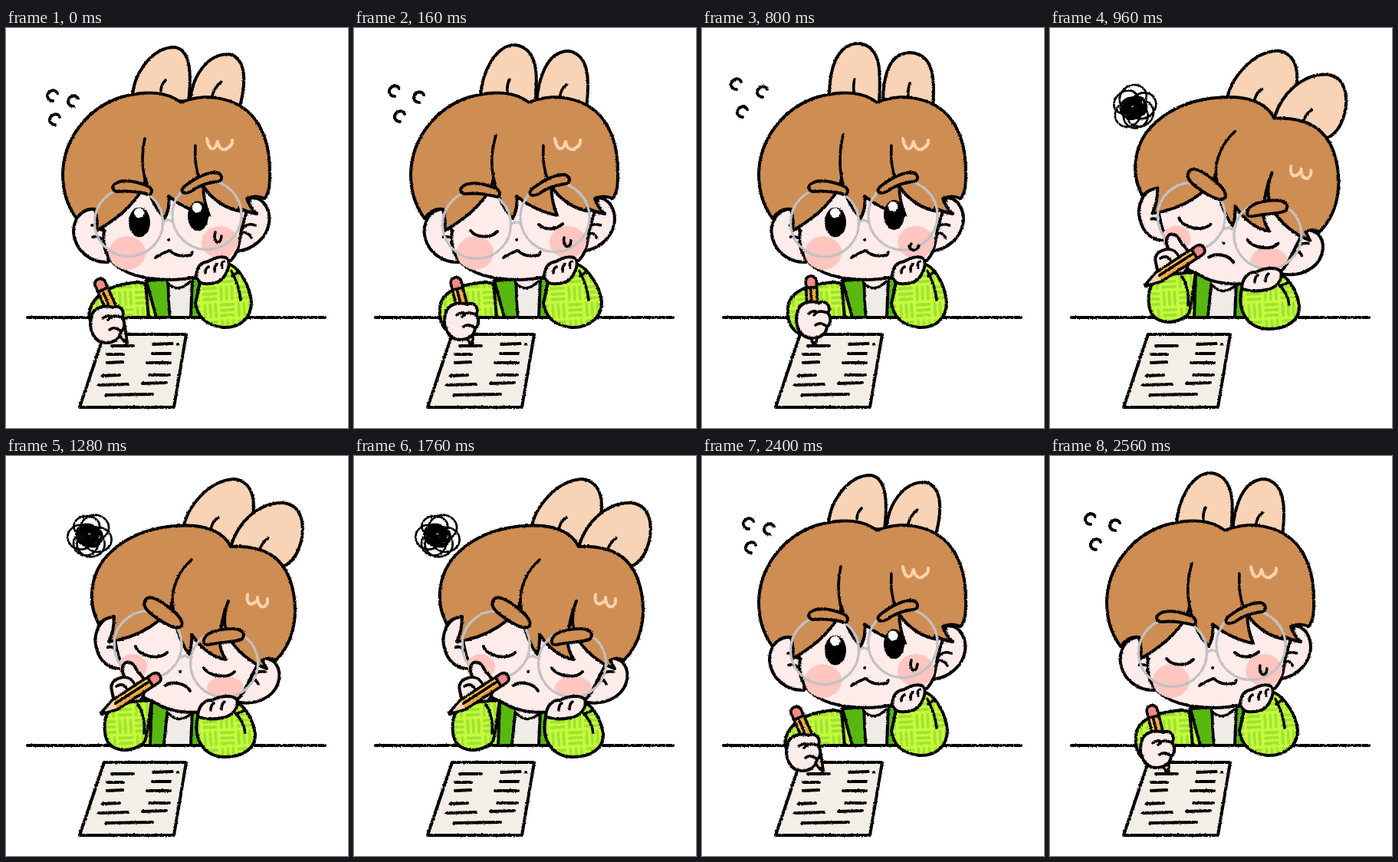
An HTML page for the animation above (2.72 s loop, 446 by 521 pixels).

```html
<!DOCTYPE html>
<html lang="en">
<head>
<meta charset="utf-8">
<style>
  html, body { margin: 0; width: 100%; height: 100%; overflow: hidden; background: #fff; }
  svg { display: block; width: 446px; height: 521px; }
</style>
</head>
<body>
<svg id="stage" viewBox="0 0 446 521" xmlns="http://www.w3.org/2000/svg"></svg>
<script>
const STEP = 160;
const ORDER = 'ABCABCDEFDEFABCAB';
const C = {
  hair: '#ce8d52', ear: '#f9d3b6', skin: '#feecea', blush: '#ffc6c0', lime: '#c6fd3b',
  knit: '#a0e234', green: '#58b810', shirt: '#efebe6', paper: '#f3efe6',
  glass: '#c1c1c4', shine: '#ffd3b1', pencil: '#ffc14c', grain: '#f4a33c', rubber: '#f58a88'
};

const shape = (d, fill = 'none', width = 4, stroke = '#000') =>
  `<path d="${d}" fill="${fill}" stroke="${stroke}" stroke-width="${width}"/>`;
const line = (d, width = 3.6) => shape(d, 'none', width);
const flat = (d, fill) => shape(d, fill, 0, 'none');
const oval = (x, y, rx, ry, fill) => `<ellipse cx="${x}" cy="${y}" rx="${rx}" ry="${ry}" fill="${fill}"/>`;
const ring = (x, y, r) => `<circle cx="${x}" cy="${y}" r="${r}" fill="none" stroke="${C.glass}" stroke-width="3.2"/>`;
const move = (x, y, art, turn = 0) => `<g transform="translate(${x} ${y}) rotate(${turn})">${art}</g>`;
const sleeve = d => flat(d, C.lime) + shape(d, 'url(#knit)');

const defs = `<defs>
  <filter id="rough" x="0" y="0" width="446" height="521" filterUnits="userSpaceOnUse" color-interpolation-filters="sRGB">
    <feTurbulence type="fractalNoise" baseFrequency=".6" numOctaves="1" seed="4"/>
    <feDisplacementMap in="SourceGraphic" scale="2.8" xChannelSelector="R" yChannelSelector="G"/>
  </filter>
  <pattern id="knit" width="44" height="44" patternUnits="userSpaceOnUse" patternTransform="translate(254 336) rotate(-3)">
    <path d="M3 4h16M3 11h16M3 18h16M25 26h16M25 33h16M25 40h16M26 3v16M33 3v16M40 3v16M4 25v16M11 25v16M18 25v16"
      stroke="${C.knit}" stroke-width="3.8" stroke-linecap="round"/>
  </pattern></defs>`;

const paper = shape('M128 399H235L219 494H96Z', C.paper) +
  line('M138 414h28M192 412l25-1M224 412v.1M132 425h21M191 424h23M132 436l20-1M184 436h30M126 453l22-1M187 452h26M121 465l38-1M178 463l31-1M130 478l61-1', 4);
const table = line('M28 377H416', 4.2);

const pencil = flat('M-7 12H7V68L1 89H-1L-7 68Z', C.pencil) + flat('M2 12H7V68H2Z', C.grain) +
  flat('M-7 68H7L1 89H-1Z', C.ear) + flat('M-7 13V4Q-6-2 0-2T7 4V13Z', C.rubber) +
  line('M-7 68V4Q-6-2 0-2T7 4V68L1 89H-1ZM-7 13H7M-1 16V66') + flat('M-3 83H3L0 91Z', '#000');

const fist = shape('M-20-12C-17-22-4-26 8-22C18-27 24-15 19-9C24-3 23 6 18 9C17 18 10 24-2 24C-17 24-26 6-20-12Z', C.skin) +
  line('M1-6C6-13 13-11 19-9M3 7C8 3 13 5 18 9M-6-8Q-1-12 3-11');

const hook = 'M7-3C4-10-7-6-6 2Q-4 7 1 7';
const hooks = pts => pts.map(([x, y]) => move(x, y, line(hook, 4))).join('');

function rabbitEars(e) {
  return shape(e.left, C.ear) + shape(e.right, C.ear) + line(e.fold);
}

const openEyes = lift => oval(174, 253, 14, 19.5, '#000') + oval(173.5, 241, 6.5, 6.5, '#fff') +
  oval(250.5, 245 - lift, 13.5, 19.5, '#000') + oval(249, 234 - lift, 6.5, 6.5, '#fff');
const shutEyes = line('M152 264C160 274 178 274 187 265M241 256C250 264 264 263 272 255', 4);

const uprightHair = 'M92 248C80 232 74 212 74 190C75 145 105 105 150 90C185 80 212 84 228 97C255 85 295 88 320 113C340 135 345 165 344 195Q344 215 337 222Q326 217 314 222Q318 234 327 242Q314 240 304 234L307 239C285 235 268 222 257 206Q258 228 265 244C245 240 228 232 212 219Q214 234 207 248C195 235 186 217 182 196C178 218 155 243 118 264Q120 248 116 236Q102 234 92 248Z';

function upright(p) {
  const body = sleeve('M160 333H252L258 377H156Z') +
    shape('M183 329L196 377H214L211 327Z', C.green) + flat('M211 325H243L241 377H213Z', C.shirt) +
    shape('M243 325L241 377H256L252 327Z', C.green) + line('M212 327Q211 350 214 377') +
    flat('M208 324H244Q238 338 224 339Q214 338 208 324Z', C.skin) + line('M210 331Q224 347 240 330', 3.4);
  const sides = move(p.in, 0, shape('M120 237C102 232 88 246 88 266C90 290 110 306 133 305L136 250Z', C.skin) + line('M112 257Q120 255 125 263M113 272Q121 271 125 275')) +
    move(-p.in, 0, shape('M310 225C333 212 346 236 343 254C340 274 322 288 302 291Z', C.skin) + line('M308 262Q314 253 325 257M309 266Q317 267 320 273'));
  const face = shape('M118 236Q122 255 128 264C125 284 131 300 146 311C165 325 190 327 215 328C246 328 276 318 294 302C305 290 304 275 308 259L318 225L228 150Z', C.skin);
  const head = sides + face + oval(158, 293, 24, 22, C.blush) + oval(279, 279, 24, 21, C.blush) +
    shape(uprightHair, C.hair) + p.eyes + line(`${p.part}M247 153Q245 178 253 199`) +
    shape('M262 144C263 153 267 159 271 157Q275 154 276 148C278 158 283 160 288 157Q296 153 295 146', 'none', 4, C.shine) +
    ring(160, 253 + p.low, 44.5) + ring(262, 243.5 + p.low, 45) +
    move(0, p.low, shape('M204 254Q210 247 217 252', 'none', 3.2, C.glass)) +
    move(0, p.brow, shape('M141 204C150 196 171 199 187 207C193 213 189 219 183 216Q164 211 144 213Q136 210 141 204Z', C.hair) +
      shape('M233 206C246 196 261 188 274 188C283 190 283 199 276 200Q256 202 241 213C230 218 226 212 233 206Z', C.hair)) +
    oval(212, 276, 2, 2, '#000') + line('M195 299Q206 292 214 290Q222 299 239 296M243 292Q242 297 238 297') + line(p.sweat);
  const arm = sleeve(`M290 307C307 314 ${p.elbow - 2} 338 ${p.elbow} 357C${p.elbow} 380 303 391 283 390C260 387 250 376 247 358L253 332Z`) +
    line('M294 317Q304 335 306 354M295 323L304 317');
  const hand = shape('M248 322C249 311 255 305 264 304C271 299 282 296 289 300C294 310 286 326 276 331C262 335 250 335 248 322Z', C.skin) +
    line('M260 319Q260 313 264 311M272 317Q271 311 275 307M282 312Q280 306 284 304');
  return hooks(p.hooks) + rabbitEars(p) + body + table + paper + sleeve(p.arm) + head + arm + hand +
    move(...p.pencil, pencil, p.tilt) + move(...p.fist, fist);
}

const bentArm = 'M172 331C145 333 120 340 113 358C109 380 116 395 130 399L160 377L186 377L182 333Z';
const poses = {
  A: upright({
    left: 'M165 90C166 60 190 25 220 25C241 28 242 60 238 96Z', right: 'M240 96C243 60 264 34 290 34C315 38 313 75 304 105Z',
    fold: 'M202 82Q202 74 208 68M268 91Q272 76 281 70', part: 'M181 144Q175 170 181 196',
    hooks: [[60, 88], [87, 95], [63, 119]], eyes: openEyes(0), in: 0, low: 0, brow: 0, elbow: 320,
    sweat: 'M273 266C270 277 276 283 280 276L281 271',
    arm: 'M172 331C148 333 127 340 116 354C107 366 106 378 113 386L160 377L186 377L182 333Z',
    pencil: [121, 329], tilt: -24, fist: [132, 386]
  }),
  B: upright({
    left: 'M165 90C166 58 185 22 210 22C240 26 240 60 236 98Z', right: 'M238 98C241 60 254 30 280 30C308 35 307 70 303 105Z',
    fold: 'M200 83Q199 74 203 67M268 91Q270 79 277 74', part: 'M185 140Q176 168 182 196',
    hooks: [[52, 82], [84, 90], [59, 115]], eyes: shutEyes, in: 3.5, low: 3, brow: 3, elbow: 323,
    sweat: 'M274 273C272 283 278 288 282 282L283 277',
    arm: bentArm, pencil: [132, 327], tilt: -14, fist: [140, 382]
  }),
  C: upright({
    left: 'M166 88C166 55 175 20 205 20C235 24 233 60 231 98Z', right: 'M236 98C236 60 245 32 272 32C305 35 303 70 301 105Z',
    fold: 'M198 83Q197 74 199 67M269 91Q268 80 271 72', part: 'M184 139Q177 167 182 196',
    hooks: [[44, 73], [78, 83], [52, 109]], eyes: openEyes(1.5), in: 2.5, low: .5, brow: 0, elbow: 319,
    sweat: 'M270 284C273 292 281 291 283 283M273 281L271 285',
    arm: bentArm, pencil: [142, 325], tilt: -3, fist: [145, 380]
  })
};

// A few wide loose loops around a dense knot.
function scribble(turn) {
  let seed = 7;
  const rand = () => (seed = seed * 16807 % 2147483647) / 2147483647;
  let loops = '';
  for (let i = 0; i < 26; i++) {
    const wide = i < 6, angle = i * 2.4 + 2, off = wide ? 12 : 6 * rand();
    const rx = wide ? 16 + 3 * rand() : 5 + 10 * rand();
    loops += `<ellipse cx="${off * Math.cos(angle)}" cy="${off * Math.sin(angle)}" rx="${rx}" ry="${rx * (.75 + .25 * rand())}"/>`;
  }
  return move(109, 103, `<g fill="none" stroke="#000" stroke-width="2.7">${loops}</g>`, turn);
}

const slumpedHair = 'M141 209Q128 211 121 219C113 204 110 186 113 170C118 130 160 95 222 91C255 88 282 96 293 118C330 116 358 128 370 160C382 195 380 238 352 266Q342 261 334 266L340 277C320 270 303 256 290 236Q280 215 290 189Q279 215 279 246Q281 258 287 265C270 263 253 249 242 232Q243 246 239 258C230 247 219 224 217 190C208 214 175 236 134 242Q141 228 141 209Z';

function slumped(turn, dx, dy) {
  const ears = rabbitEars({
    left: 'M231 95C236 66 264 32 297 30C325 33 327 66 318 88L293 118Z',
    right: 'M293 118C303 85 330 60 362 61C391 65 391 101 380 125Q372 141 360 144Z',
    fold: 'M267 98Q268 85 277 80M331 122Q334 112 342 107'
  });
  const body = flat('M184 318H254L256 377H170Z', C.lime) + shape('M190 320L188 377H206L211 328Z', C.green) +
    flat('M211 328H243L241 377H206Z', C.shirt) + shape('M243 328L241 377H256L250 328Z', C.green) +
    line('M211 329L206 377') + flat('M208 325H244Q238 343 224 343Q213 342 208 325Z', C.skin) + line('M211 334Q224 350 241 336', 3.4);
  const sides = shape('M334 264C352 262 360 279 355 295C349 315 324 326 300 320Z', C.skin) + line('M317 288Q327 279 338 281M319 291Q327 291 329 297');
  const leftEar = flat('M142 209C121 210 113 235 118 250C122 268 136 277 148 277L142 240L134 242Z', C.skin) +
    line('M141 209C121 210 113 235 118 250C122 268 134 276 147 277M133 249Q139 247 144 254', 4);
  const face = shape('M140 215Q141 245 148 264C150 292 168 312 196 322C215 335 245 336 270 331Q300 326 311 305L330 268L225 150Z', C.skin);
  const head = sides + face + oval(165, 275, 19, 17, C.blush) + oval(286, 302, 24, 15, C.blush) + leftEar + shape(slumpedHair, C.hair) +
    line('M242 135C225 150 216 171 217 192') +
    line('M169 248C172 260 199 267 210 256M258 276C265 287 289 291 298 281', 4) +
    shape('M315 180C313 189 317 195 322 192Q328 190 328 184C328 193 332 198 337 196Q342 193 341 186', 'none', 4, C.shine) +
    ring(185, 246, 44) + ring(284.5, 270, 44) + shape('M227 263Q234 258 241 264', 'none', 3.2, C.glass) +
    shape('M181 189C184 181 195 184 208 194C222 204 232 213 229 221C224 227 211 221 198 212C186 204 178 197 181 189Z', C.hair) +
    shape('M258 240C259 231 275 225 295 225C310 225 313 233 307 239C296 243 282 242 268 245C260 247 257 245 258 240Z', C.hair) +
    oval(227, 281, 2, 2, '#000') + line('M208 299C215 293 234 295 240 306', 4);
  const arms = sleeve('M135 328C126 344 126 370 138 378C152 387 170 383 181 372C186 357 187 335 190 319Q166 316 135 328Z') +
    line('M172 324Q182 338 180 361') +
    sleeve('M250 340C244 366 256 392 286 392C310 392 326 380 325 362C322 344 314 329 303 322Z') + line('M297 333Q309 343 312 360M300 336L312 331');
  const rightHand = shape('M250 339C251 325 259 317 269 318C280 312 295 311 301 317C304 328 295 339 282 341Q262 345 250 339Z', C.skin) +
    line('M267 331Q267 325 271 322M281 330Q281 323 285 320');
  const leftHand = shape('M138 306C135 296 142 289 155 288C148 277 153 266 162 269C171 273 168 280 175 284C184 293 183 309 175 319Q154 323 140 315Z', C.skin) +
    line('M144 300Q152 295 157 302M155 288Q166 290 168 299') + move(199, 287, pencil, 57);
  return scribble(turn) + move(dx, dy, ears) + body + table + paper + move(dx, dy, head) + arms + rightHand + leftHand;
}
poses.D = slumped(-38, -.6, -.4);
poses.E = slumped(35, .4, .5);
poses.F = slumped(0, 0, 0);

const stage = document.getElementById('stage');
stage.innerHTML = defs + '<g filter="url(#rough)" stroke-linecap="round" stroke-linejoin="round">' +
  Object.entries(poses).map(([name, art]) => `<g id="pose${name}" display="none">${art}</g>`).join('') + '</g>';

let current = '';
function show(name) {
  if (name === current) return;
  if (current) document.getElementById('pose' + current).setAttribute('display', 'none');
  document.getElementById('pose' + name).setAttribute('display', 'inline');
  current = name;
}

const start = performance.now();
function tick() {
  const elapsed = Math.max(0, performance.now() - start);
  show(ORDER[Math.floor(elapsed / STEP) % ORDER.length]);
  requestAnimationFrame(tick);
}
tick();
</script>
</body>
</html>
```
